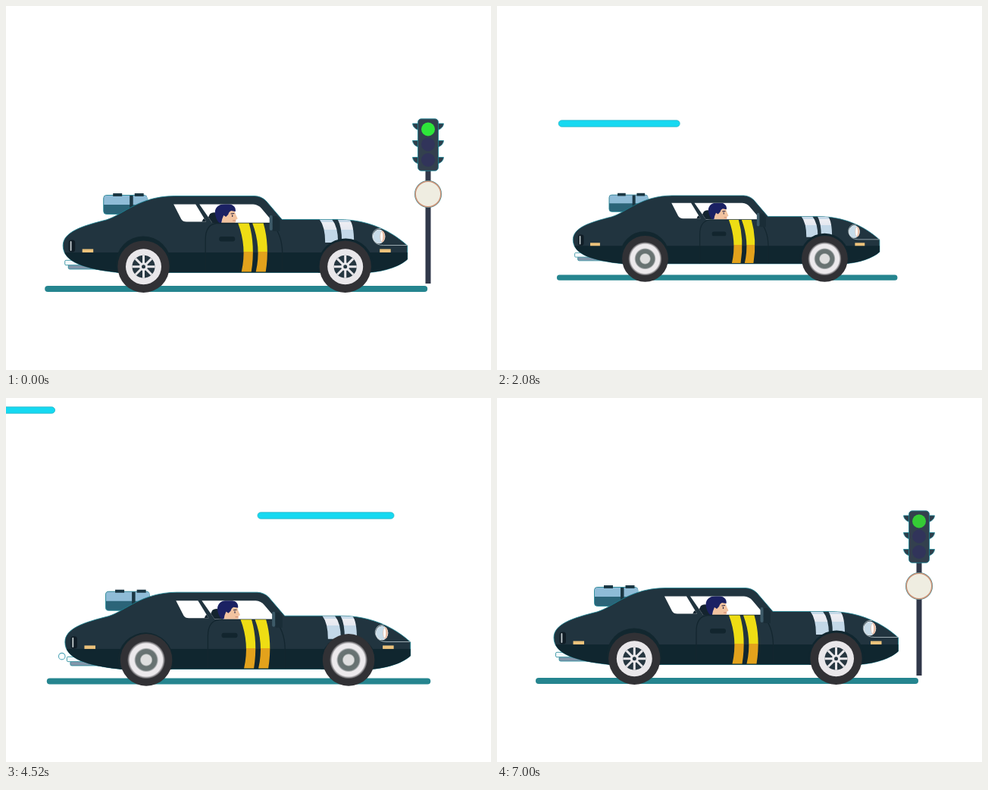
An HTML page for the animation above (7.92 s loop, 640 by 480 pixels).

```html
<!DOCTYPE html>
<html lang="en">
<head>
<meta charset="utf-8">
<title>Car at the lights</title>
<style>
  html, body { margin: 0; width: 100%; height: 100%; overflow: hidden; background: #fff; }
  svg { display: block; width: 100vw; height: 100vh; }
  .edge { stroke: #1b8797; stroke-width: .8; }
</style>
</head>
<body>
<svg viewBox="0 0 640 480">
  <defs>
    <path id="shell" d="M75 316C75 298 100 290 132 282C155 275 175 251 222 250.5H328Q337 251 343 257L364 281.5H440C475 282 505 294 529.5 316V334C520 343 500 350 478 351.5H148C105 347 75 338 75 316Z"/>
    <path id="glassA" d="M221 261.5H250L264 284.5H238Q233 284.5 231 281Z"/>
    <path id="glassB" d="M255 261.5H326Q333 262 337 267L348 280V286H272Z"/>
    <path id="stripe" d="M306 286.5H320.5Q329 316 323.5 350.5H310.5Q318 318 306 286.5Z"/>
    <clipPath id="inShell"><use href="#shell"/></clipPath>
    <clipPath id="inGlass"><use href="#glassA"/><use href="#glassB"/></clipPath>
    <mask id="holes" maskUnits="userSpaceOnUse" x="60" y="230" width="490" height="140">
      <rect x="60" y="230" width="490" height="140" fill="#fff"/>
      <use href="#glassA"/><use href="#glassB"/>
    </mask>
    <linearGradient id="gold" gradientUnits="userSpaceOnUse" x1="0" y1="286" x2="0" y2="352">
      <stop offset=".57" stop-color="#eedd14"/><stop offset=".57" stop-color="#e3a21c"/>
    </linearGradient>
    <linearGradient id="silver" gradientUnits="userSpaceOnUse" x1="0" y1="282" x2="0" y2="310">
      <stop offset=".12" stop-color="#c6d9e8"/><stop offset=".12" stop-color="#eeeef3"/>
      <stop offset=".45" stop-color="#e4e8f0"/><stop offset=".45" stop-color="#c3d8e8"/>
    </linearGradient>
    <radialGradient id="blur">
      <stop offset=".27" stop-color="#dedede"/><stop offset=".34" stop-color="#667170"/>
      <stop offset=".55" stop-color="#6a7474"/><stop offset=".64" stop-color="#ece9ec"/>
      <stop offset=".86" stop-color="#ece9ec"/><stop offset="1" stop-color="#313135"/>
    </radialGradient>
    <g id="wheel">
      <circle r="34.2" fill="#313135"/>
      <g id="rim">
        <circle r="23.5" fill="#e9e7ea"/>
        <circle r="15" fill="#263640"/>
        <path d="M-15 0H15M0-15V15M-10.6-10.6 10.6 10.6M-10.6 10.6 10.6-10.6" stroke="#e9e7ea" stroke-width="3"/>
        <circle r="5.5" fill="#e9e7ea"/>
        <circle r="2.5" fill="#263640"/>
      </g>
      <circle id="spin" r="25" fill="url(#blur)"/>
    </g>
  </defs>

  <g id="lines" fill="#15d9f1" stroke="#2bb4c6" stroke-width=".8"></g>

  <g id="light">
    <rect x="-3.5" y="216" width="7" height="150" fill="#31384a"/>
    <g id="visors" fill="#2f3e4b" class="edge"></g>
    <rect x="-13.5" y="148.8" width="27" height="68.5" rx="4.5" fill="#33404e" class="edge"/>
    <circle id="go" cy="162.5" r="9"/>
    <circle cy="182.5" r="9" fill="#31345a"/>
    <circle id="stop" cy="203" r="9"/>
    <circle cy="248" r="18" fill="#3a8d9a"/>
    <circle cy="248" r="16.8" fill="#efede1" stroke="#cf9377" stroke-width="1.5"/>
  </g>

  <g id="scene">
    <rect x="51" y="369" width="505" height="8" rx="4" fill="#25858f"/>
    <g id="puffs" stroke="#4fa5b8" stroke-width="1.1"></g>
    <g id="body">
      <rect x="82" y="341" width="46" height="6" rx="2" fill="#8296aa" class="edge"/>
      <rect x="77.5" y="335.3" width="44" height="6.4" rx="1.5" fill="#f4f8fa" class="edge"/>
      <rect x="128.5" y="249.5" width="57.5" height="25" rx="4" fill="#2b6478" class="edge"/>
      <path d="M129 262V253Q129 250 132 250H183Q186 250 186 253V262Z" fill="#8fbcd7"/>
      <path d="M163 250H167.5V272H163ZM141 247H153V251H141ZM169.5 247H181.5V251H169.5Z" fill="#1b3743"/>

      <use href="#shell" fill="#21343f" class="edge" mask="url(#holes)"/>
      <g clip-path="url(#inGlass)">
        <path id="shine" d="M228 255H260L258 290H241ZM255 255H270L280 290H262ZM275 255H287L272 290H262Z" fill="#7fd0dc"/>
        <path d="M257 287L260 281Q264 278 266 280L269 274Q273 271 278 273L283 287Z" fill="#14242f"/>
        <path d="M284 288L285 276Q289 267 301 269L303 275L305.5 280.5L303 282L303.2 285Q301 287 297 286.5V288Z" fill="#f2c3a0"/>
        <path d="M275.5 272C276 265 281 261 289 261C297 260 304 264 302.5 271L297 270Q294 271 293 275L290 278L287 276L285 281L284 286H281Q276 280 275.5 272Z" fill="#1b2163"/>
        <path d="M296.500 274L301 273.500M298.500 275.500V278" stroke="#2a2844" stroke-width="1.2"/>
        <path d="M299 283H303" stroke="#c4715e" stroke-width=".8"/>
      </g>
      <g clip-path="url(#inShell)">
        <rect x="70" y="325" width="465" height="30" fill="#10262f"/>
        <circle cx="181" cy="340" r="36.5" fill="#12272f"/>
        <path d="M263 351V308Q263 288 278 286.5H350Q364 300 364.5 325V351" fill="none" stroke="#13262f" stroke-width="1.3"/>
        <use href="#stripe" fill="url(#gold)"/>
        <use href="#stripe" x="19" fill="url(#gold)"/>
        <g fill="url(#silver)">
          <path d="M413.5 281.5H430Q438 291 438 312H421Q421 291 413.5 281.5Z"/>
          <path d="M437.5 281.5H453Q459 288 459 312H443Q443 291 437.5 281.5Z"/>
        </g>
        <circle cx="448" cy="343.5" r="37" fill="#10262f"/>
      </g>
      <rect x="281" y="304" width="21" height="6.5" rx="3" fill="#12252e"/>
      <path d="M351 277H357L361 282V297H352Z" fill="#1a2d37"/>
      <rect x="347.5" y="276" width="4" height="20" rx="2" fill="#3d5a68"/>
      <path d="M495 293.5C484 292 481 303 485 309Q488 315.5 498 315.5H529.5" fill="none" stroke="#9cabb1"/>
      <ellipse cx="492" cy="304" rx="7.8" ry="9" fill="#c7dbe8" stroke="#e7eef2"/>
      <ellipse cx="496.5" cy="304" rx="3.2" ry="7.5" fill="#e8bda5"/>
      <ellipse cx="495.5" cy="304" rx="1.5" ry="6.5" fill="#fff"/>
      <rect x="493" y="320.5" width="14.5" height="4.5" fill="#ecc27b"/>
      <rect x="100.5" y="320.5" width="14.5" height="4.5" fill="#ecc27b"/>
      <rect x="82.5" y="308.5" width="8.5" height="16" rx="3.5" fill="#101d26"/>
      <rect x="84.5" y="310" width="1.8" height="13" rx=".9" fill="#c3cccf"/>
    </g>
    <g id="wheels">
      <use href="#wheel" x="181.3" y="343.7"/>
      <use href="#wheel" x="447.5" y="343.7"/>
    </g>
  </g>
</svg>
<script>
const LOOP = 7920, STEP = 40, DARK = '#31345a';
const $ = id => document.getElementById(id);
const set = (el, attrs) => { for (const k in attrs) el.setAttribute(k, attrs[k]); return el; };
const add = (parent, tag, attrs) =>
  parent.appendChild(set(document.createElementNS('http://www.w3.org/2000/svg', tag), attrs));
const mix = (a, b, u) => a + (b - a) * u;
const clamp = u => Math.min(1, Math.max(0, u));
const ease = u => (1 - Math.cos(Math.PI * u)) / 2;
const ramp = (t, a, b) => ease(clamp((t - a) / (b - a)));

// Keys are [time, value, power]; the power skews the easing toward that key.
function track(keys, t) {
  if (t <= keys[0][0]) return keys[0][1];
  for (let i = 1; i < keys.length; i++) {
    const [a, va] = keys[i - 1], [b, vb, p = 1] = keys[i];
    if (t < b) return mix(va, vb, ease(((t - a) / (b - a)) ** p));
  }
  return keys[keys.length - 1][1];
}

const ZOOM = [[1500, 1], [2070, .89], [3050, 1.092], [4800, 1, .7]];
const PAN = [[2080, 303.7], [2900, 284], [3760, 324.5], [4800, 303.5]];
const TILT = [[0, 0], [400, .2], [840, 1.8], [1400, 0]];

// Speed lines: y, width, start time
const SPEED = 2.2;
const lines = [
  [16, 210, 963], [155, 160, 1826], [85.5, 160, 2100], [16, 210, 2563],
  [155, 210, 2728], [85.5, 180, 3300], [16, 210, 4163], [155, 180, 4380]
].map(([y, w, at]) => ({ at, el: add($('lines'), 'rect', { y: y - 4.2, width: w, height: 8.4, rx: 4.2 }) }));

// Exhaust puffs: start, duration, from x y, to x y, radius, fill
const puffs = [
  [60, 1040, 76, 338, -18.7, 222, 7, '#d0a478'],
  [760, 400, 76, 333, 52, 318, 2.5],
  [3560, 450, 78, 342, 56.5, 333, 6.3],
  [3700, 500, 66, 330, 53, 317, 3.5],
  [4420, 480, 78, 342, 44, 334, 7],
  [5080, 500, 78, 342, 40, 334, 8],
  [5200, 440, 78, 346, 52, 342, 4.6],
  [5560, 500, 78, 342, 52, 335, 6.5]
].map(row => ({ row, el: add($('puffs'), 'circle', { fill: row[7] || '#fff' }) }));

for (const y of [155, 177.5, 199.5])
  for (const side of [1, -1])
    add($('visors'), 'path', { d: 'M12 0H20.5Q20 6 13 8.5Z', transform: `translate(0 ${y}) scale(${side} 1)` });

function lightX(t) {
  if (t < 3000) return 557 - 151 * (t / 840) ** 3;
  return 557 + 26 * (Math.max(0, 6200 - t) / 600) ** 4;
}

function draw(t) {
  const x = lightX(t), run = ramp(t, 1000, 1700) * (1 - ramp(t, 5400, 6200));
  const spin = ramp(t, 200, 600) * (1 - ramp(t, 5800, 6200));
  const bob = run * (3.2 + 3 * Math.sin(2 * Math.PI * ((t - 2080) / 970 + .635)));
  const red = t >= 3000 && t < 7000;

  set($('scene'), { transform: `translate(${track(PAN, t)} 238) scale(${track(ZOOM, t)}) translate(-303.5 -238)` });
  set($('body'), { transform: `translate(0 ${bob}) rotate(${track(TILT, t)} 290 340)` });
  set($('wheels'), { transform: `translate(${spin * .6} ${spin * 1.4})` });
  set($('rim'), { transform: `rotate(${((557 - x) / 34 * 180 / Math.PI) % 360})` });
  set($('spin'), { opacity: spin });
  set($('shine'), { transform: `translate(${(840 - t) * .5} 0)`, visibility: t > 600 && t < 1100 ? 'visible' : 'hidden' });

  set($('light'), { transform: `translate(${Math.max(-100, Math.min(740, x))} 0)` });
  set($('go'), { fill: red ? DARK : t < 3000 ? '#2ee63a' : '#35cb35' });
  set($('stop'), { fill: red ? '#e6403c' : DARK });

  for (const { at, el } of lines) {
    const left = 640 - (t - at) * SPEED;
    set(el, { x: left, visibility: left < 640 && left > -220 ? 'visible' : 'hidden' });
  }
  for (const { row, el } of puffs) {
    const [at, dur, x0, y0, x1, y1, r] = row, u = (t - at) / dur, on = u > 0 && u < 1;
    set(el, {
      cx: mix(x0, x1, u), cy: mix(y0, y1, u),
      r: on ? r * Math.sin(Math.PI * u) : 0, visibility: on ? 'visible' : 'hidden'
    });
  }
}

const begin = performance.now();
function frame() {
  const t = (performance.now() - begin) % LOOP;
  draw(Math.floor(t / STEP) * STEP);
  requestAnimationFrame(frame);
}
frame();
</script>
</body>
</html>
```
